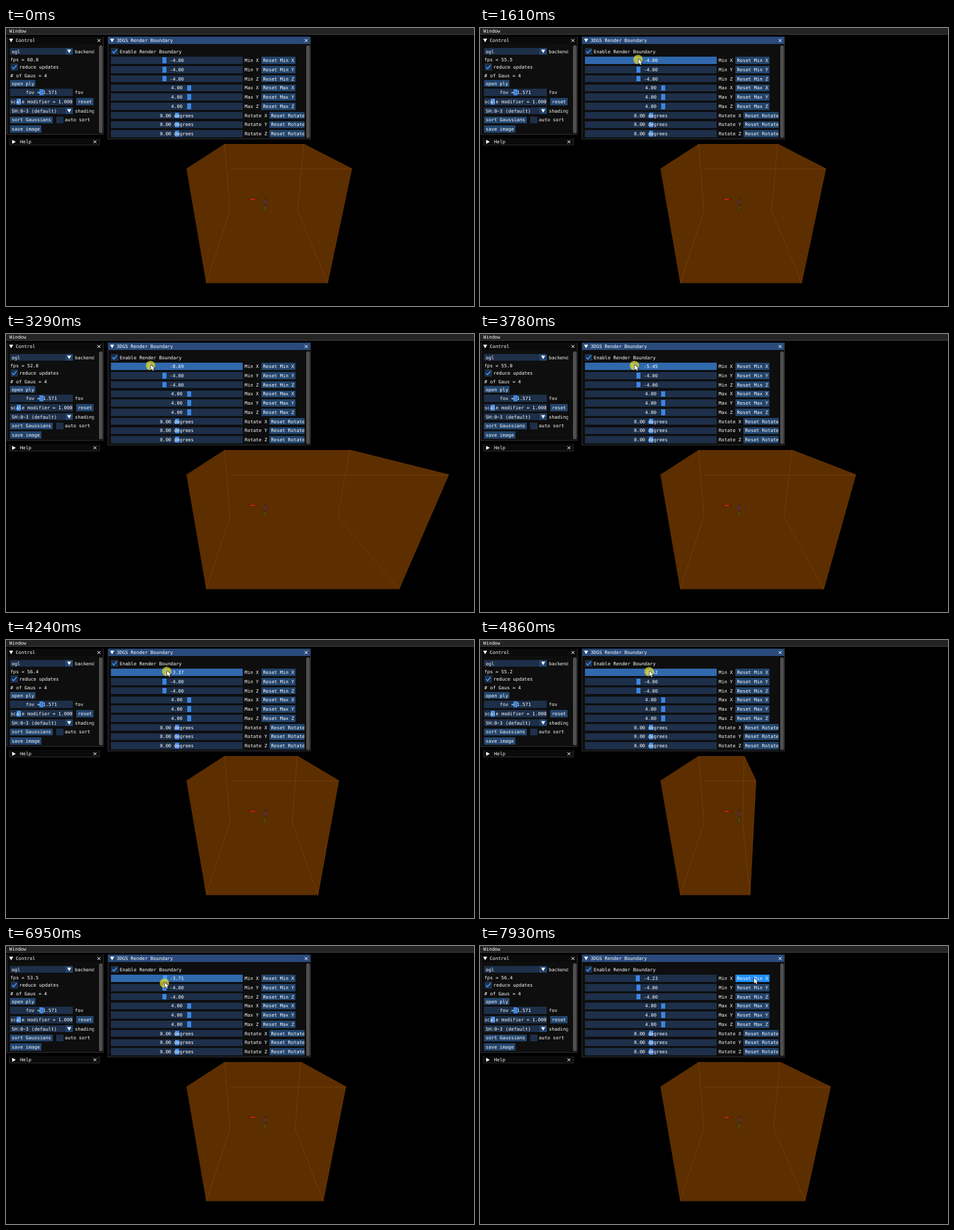
Write an HTML page with a canvas that moves like this. It is 700 by 417 pixels and loops after 8000 ms.

```html
<!DOCTYPE html>
<html lang="en">
<head>
<meta charset="utf-8">
<title>Render boundary</title>
<style>
html, body { margin: 0; width: 100%; height: 100%; overflow: hidden; background: #000; }
canvas { display: block; }
</style>
</head>
<body>
<canvas id="stage" width="700" height="417"></canvas>
<script>
const ctx = document.getElementById('stage').getContext('2d');
const LOOP = 8000, STEP = 67.5;
const ENTER = 115, PRESS = 1450, RELEASE = 7430;
const FRAME = '#1d2f49', FRAME_HOVER = '#234570', FRAME_ACTIVE = '#3169ad';
const BUTTON = '#23456d', BUTTON_HOVER = '#1f8ffc';
const GRAB = '#3d85e0', GRAB_ACTIVE = '#4296fa', BORDER = '#2c2c32';
const ROW = 13.73, MID = 255.5, UNIT = 4.65;

const smooth = u => u * u * (3 - 2 * u);
const smoother = u => u * u * u * (u * (6 * u - 15) + 10);
const lateStart = u => smooth(u ** 1.5);
const easeOut = u => 1 - (1 - u) ** 1.68;

// Progress from 0 to 1 between two times
const span = (t, t0, t1) => Math.min(1, Math.max(0, (t - t0) / (t1 - t0)));
const mix = (a, b, u) => a + (b - a) * u;

// The drag: out to the left, far right, and back
function minX(t) {
  if (t < 3220) return mix(-4, -8.82, lateStart(span(t, 1480, 3220)));
  if (t < 5850) return mix(-8.82, 1.35, easeOut(span(t, 3220, 5850)));
  return mix(1.35, -4.23, smoother(span(t, 5850, 7300)));
}

const fps = t => 53.3 + 7 * Math.exp(-t / 800) - 3.2 * Math.cos((t - 2630) / 547);

function cursorAt(t) {
  if (t < ENTER) return null;
  if (t < PRESS) {
    const u = smooth(span(t, ENTER, 820));
    return { x: mix(636, 236, u), y: mix(408, 47, u) };
  }
  if (t < RELEASE) {
    return { x: MID + UNIT * minX(t + 50), y: mix(46, 54.5, smooth(span(t, 4700, 6100))) };
  }
  const u = smooth(span(t, RELEASE, 7880));
  return { x: mix(236, 410, u), y: mix(54.5, 48, u) };
}

function box(x0, y0, x1, y1, color) {
  const [l, t, r, b] = [x0, y0, x1, y1].map(Math.round);
  ctx.fillStyle = color;
  ctx.fillRect(l, t, r - l, b - t);
}

function text(str, x, y, align = 'left') {
  ctx.font = '7px "DejaVu Sans Mono", monospace';
  ctx.textAlign = align;
  ctx.fillStyle = '#fff';
  ctx.fillText(str, x, y);
}

function trace(points) {
  ctx.beginPath();
  points.forEach(p => ctx.lineTo(...p));
}

function poly(points, color) {
  trace(points);
  ctx.fillStyle = color;
  ctx.fill();
}

function line(points, color, width = 1) {
  trace(points);
  ctx.strokeStyle = color;
  ctx.lineWidth = width;
  ctx.stroke();
}

function clipped(x, y, w, h, draw) {
  ctx.save();
  ctx.beginPath();
  ctx.rect(x, y, w, h);
  ctx.clip();
  draw();
  ctx.restore();
}

function blob(x, y, rx, ry, color) {
  ctx.save();
  ctx.translate(x, y);
  ctx.scale(rx, ry);
  const g = ctx.createRadialGradient(0, 0, 0, 0, 0, 1);
  g.addColorStop(0, color);
  g.addColorStop(0.4, color);
  g.addColorStop(1, 'transparent');
  ctx.fillStyle = g;
  ctx.fillRect(-1, -1, 2, 2);
  ctx.restore();
}

function button(label, x0, x1, y, color = BUTTON) {
  box(x0, y - 5.3, x1, y + 5.3, color);
  text(label, x0 + 2.5, y + 2.5);
}

function checkbox(label, x, y, on) {
  box(x, y - 5.3, x + 10.6, y + 5.3, FRAME);
  if (on) line([[x + 2, y], [x + 4.3, y + 2.7], [x + 8.8, y - 2.8]], GRAB_ACTIVE, 1.5);
  text(label, x + 13, y + 2.5);
}

function slider(label, x0, x1, y, grab, color = FRAME, grabColor = GRAB) {
  box(x0, y - 5.3, x1, y + 5.3, color);
  box(grab - 3, y - 4.3, grab + 3, y + 4.3, grabColor);
  text(label, (x0 + x1) / 2, y + 2.5, 'center');
}

function combo(label, y) {
  box(6, y - 5.3, 100, y + 5.3, FRAME);
  box(89, y - 5.3, 100, y + 5.3, BUTTON);
  poly([[91.5, y - 2.5], [97.5, y - 2.5], [94.5, y + 2.7]], '#fff');
  text(label, 8.5, y + 2.5);
}

function panel(title, x0, y0, x1, y1, titleColor, open = true) {
  box(x0, y0, x1, y1, BORDER);
  box(x0 + 1, y0 + 1, x1 - 1, y1 - 1, '#0e0e0e');
  box(x0 + 1, y0, x1 - 1, Math.min(y0 + 11, y1 - 1), titleColor);
  const y = y0 + 5.7, x = x0 + 6.7, c = x1 - 7;
  poly(open ? [[x - 3, y - 2.7], [x + 3, y - 2.7], [x, y + 2.8]]
            : [[x - 2.5, y - 3], [x + 3, y], [x - 2.5, y + 3]], '#fff');
  text(title, x0 + (open ? 13.5 : 16), y + 2.7);
  line([[c - 2.2, y - 2.2], [c + 2.2, y + 2.2]], '#fff');
  line([[c - 2.2, y + 2.2], [c + 2.2, y - 2.2]], '#fff');
}

function scrollbar(x, y0, y1) {
  box(x - 1, y0 - 1, x + 6, y1 + 1, '#090909');
  ctx.beginPath();
  ctx.roundRect(x, y0, 5.5, y1 - y0, 2.5);
  ctx.fillStyle = '#4f4f4f';
  ctx.fill();
}

function scene(v) {
  // Left corners are fixed, right ones follow the boundary value
  const A = [270, 211], B = [327, 174], C = [335, 274], D = [299.5, 382.5];
  const A2 = [393.5 - 30.9 * v, 211], B2 = [386 - 14.75 * v, 174];
  const C2 = [385 - 12.8 * v, 274], D2 = [389.75 - 22.8 * v, 382.5];
  const fill = '#5c2e00', edge = '#794009';
  poly([A, B, B2, A2, D2, D], fill);
  poly([A, B, B2, C2, D2, D], fill);
  line([B, C, D], edge, 0.8);
  line([B2, C2, D2], edge, 0.8);
  line([[C[0], 211.5], [A2[0], 211.5]], edge, 0.8);
  line([B2, A2, D2], edge, 0.7);
  if (v < 1) blob(369, 257, 8, 1.8, '#c82800');
  if (v < 0) {
    blob(387.5, 270, 1.4, 8, '#4a6a10');
    blob(388, 261, 1.4, 7, '#48307a');
  }
}

function control(t) {
  panel('Control', 1, 13, 146, 160, '#0a0a0a');
  scrollbar(139, 26, 158);
  const row = i => 83 + i * ROW;
  clipped(2, 25, 129.5, 134, () => {
    combo('ogl', 35);
    text('backend', 103, 37.5);
    text('fps = ' + fps(t).toFixed(1), 6.5, 50);
    checkbox('reduce updates', 7, 58.5, true);
    text('# of Gaus = 4', 6.5, 73.5);
    button('open ply', 6, 44, row(0));
    slider('fov = 1.571', 6, 100, row(1), 53);
    text('fov', 103, row(1) + 2.5);
    slider('scale modifier = 1.000', 6, 100, row(2), 18.5);
    button('reset', 105, 131, row(2));
    combo('SH:0~3 (default)', row(3));
    text('shading', 103, row(3) + 2.5);
    button('sort Gaussians', 6, 70, row(4));
    checkbox('auto sort', 75, row(4), false);
    button('save image', 6, 53, row(5));
  });
}

function boundary(v, held, cursor) {
  panel('3DGS Render Boundary', 152, 13, 456, 167, '#294a7a');
  poly([[455, 160], [455, 166], [449, 166]], '#1b3354');
  scrollbar(449, 26, 165);
  checkbox('Enable Render Boundary', 157, 35, true);
  const over = (x0, x1) => cursor && !held && cursor.y > 43 && cursor.y < 54 &&
    cursor.x > x0 && cursor.x < x1;
  const trackColor = held ? FRAME_ACTIVE : over(157, 354) ? FRAME_HOVER : FRAME;
  const resetColor = over(382, 433) ? BUTTON_HOVER : BUTTON;
  ['Min', 'Max', 'Rotate'].forEach((kind, g) => ['X', 'Y', 'Z'].forEach((axis, i) => {
    const row = g * 3 + i, y = 48.7 + row * ROW, first = row === 0, rotate = g === 2;
    const value = first ? v : [-4, 4, 0][g];
    const name = kind + ' ' + axis;
    slider(value.toFixed(2) + (rotate ? ' degrees' : ''), 157, 354, y, MID + UNIT * value,
      first ? trackColor : FRAME, first && held ? GRAB_ACTIVE : GRAB);
    text(name, 357, y + 2.5);
    clipped(380, 26, 66.5, 140, () => button('Reset ' + name, rotate ? 394 : 382,
      rotate ? 460 : 433, y, first ? resetColor : BUTTON));
  }));
}

function pointer({ x, y }, held) {
  if (held) {
    ctx.beginPath();
    ctx.arc(x - 0.5, y + 1.2, 7, 0, Math.PI * 2);
    ctx.fillStyle = 'rgba(222, 214, 40, 0.75)';
    ctx.fill();
  }
  const arrow = [[0, 0], [0, 8], [1.9, 6.3], [3.2, 9.2], [4.5, 8.6], [3.2, 5.8], [5.8, 5.7], [0, 0]]
    .map(([dx, dy]) => [x + dx, y + dy]);
  line(arrow, '#111', 1.2);
  poly(arrow, '#fff');
}

function draw() {
  const t = Math.max(0, Math.floor((performance.now() % LOOP + 6) / STEP) * STEP);
  const v = minX(t);
  const held = t >= PRESS && t < RELEASE;
  const cursor = cursorAt(t);
  box(0, 0, 700, 417, '#000');
  scene(v);
  box(0, 0, 700, 9, '#242424');
  box(0, 9, 700, 10, '#3c3c45');
  text('Window', 5, 7.3);
  control(t);
  panel('Help', 5, 165, 140, 176, '#0a0a0a', false);
  boundary(v, held, cursor);
  if (cursor) pointer(cursor, held);
  requestAnimationFrame(draw);
}
draw();
</script>
</body>
</html>
```
